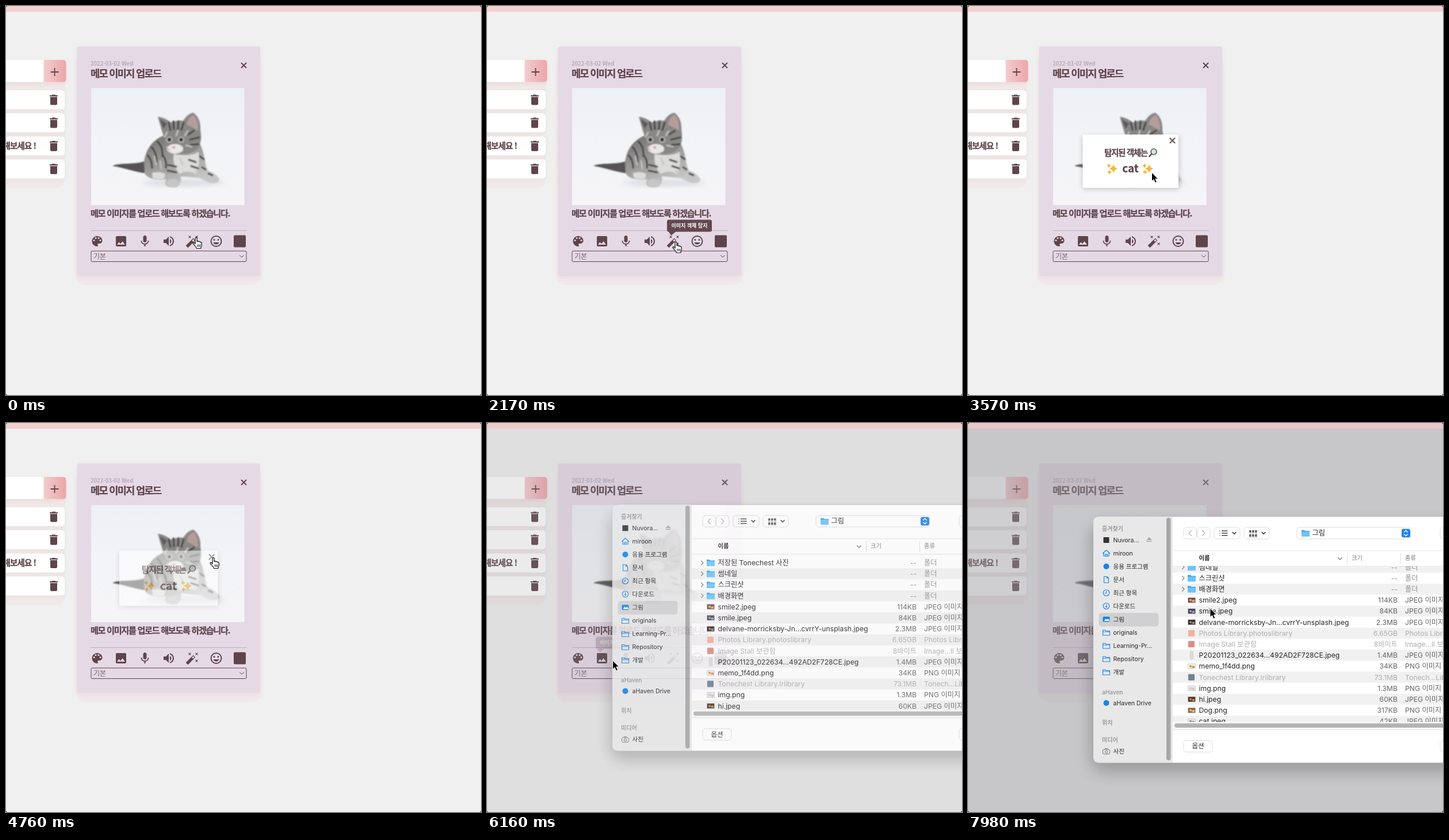
An HTML page that plays this animation: 826x678 px, repeating every 8000 ms.

```html
<!DOCTYPE html>
<html lang="ko">
<head>
<meta charset="utf-8">
<title>메모</title>
<style>
html, body { margin: 0; width: 100%; height: 100%; overflow: hidden; background: #f0f0f0; }
svg { display: block; }
text { font-family: "Noto Sans CJK KR", "Noto Sans CJK", sans-serif; fill: #5e454b; }
.b { font-weight: 700; }
.x { font-weight: 900; stroke: #5e454b; stroke-width: .25px; }
.ui text { font-family: Inter, "Noto Sans CJK KR", "Noto Sans CJK", sans-serif; fill: #262626; }
.ui .head { font-size: 10px; font-weight: 600; fill: #9b9b9d; }
.ui .side { font-size: 10.5px; }
.ui .file { font-size: 12.2px; }
.ui .dim { fill: #aeaeae; }
.ui .col { font-size: 10.3px; fill: #777; }
.line { fill: none; stroke-linecap: round; stroke-linejoin: round; }
</style>
</head>
<body>
<svg id="stage" width="826" height="678" viewBox="0 0 826 678"></svg>
<script>
const INK = '#5e454b', BLUE = '#1683e6';
const rect = (x, y, w, h, fill, r = 0, more = '') =>
  `<rect x="${x}" y="${y}" width="${w}" height="${h}" rx="${r}" fill="${fill}" ${more}/>`;
const circle = (x, y, r, fill, more = '') => `<circle cx="${x}" cy="${y}" r="${r}" fill="${fill}" ${more}/>`;
const path = (d, fill, more = '') => `<path d="${d}" fill="${fill}" ${more}/>`;
const line = (d, color, w = 1) => `<path class="line" d="${d}" stroke="${color}" stroke-width="${w}"/>`;
const text = (x, y, s, more = '') => `<text x="${x}" y="${y}" ${more}>${s}</text>`;
const group = (id, body, more = '') => `<g id="${id}" ${more}>${body}</g>`;
const icon = (x, y, d) => path(d, INK, `fill-rule="evenodd" transform="translate(${x - 12} ${y - 12})"`);
const cross = (x, y, r, w) =>
  `<path d="M${x - r} ${y - r}l${2 * r} ${2 * r}m0 ${-2 * r}l${-2 * r} ${2 * r}" stroke="${INK}" stroke-width="${w}"/>`;

const TRASH = 'M6 19c0 1.1.9 2 2 2h8c1.1 0 2-.9 2-2V7H6v12zM19 4h-3.5l-1-1h-5l-1 1H5v2h14V4z';
const PALETTE = 'M12 3c-4.97 0-9 4.03-9 9s4.03 9 9 9c.83 0 1.5-.67 1.5-1.5 0-.39-.15-.74-.39-1.01-.23-.26-.38-.61-.38-.99 0-.83.67-1.5 1.5-1.5H16c2.76 0 5-2.24 5-5 0-4.42-4.03-8-9-8z';
const IMAGE = 'M21 19V5c0-1.1-.9-2-2-2H5c-1.1 0-2 .9-2 2v14c0 1.1.9 2 2 2h14c1.1 0 2-.9 2-2zM8.5 13.5l2.5 3.01L14.5 12l4.5 6H5l3.5-4.5z';
const MIC = 'M12 14c1.66 0 3-1.34 3-3V5c0-1.66-1.34-3-3-3S9 3.34 9 5v6c0 1.66 1.34 3 3 3zm5.3-3c0 3-2.54 5.1-5.3 5.1S6.7 14 6.7 11H5c0 3.41 2.72 6.23 6 6.72V21h2v-3.28c3.28-.48 6-3.3 6-6.72z';
const SOUND = 'M3 9v6h4l5 5V4L7 9zm13.5 3c0-1.77-1.02-3.29-2.5-4.03v8.05c1.48-.73 2.5-2.25 2.5-4.02zM14 3.23v2.06c2.89.86 5 3.54 5 6.71s-2.11 5.85-5 6.71v2.06c4.01-.91 7-4.49 7-8.77s-2.99-7.86-7-8.77z';
const star = (x, y) => `M${x} ${y + 3.6}l2.5 1.4-1.4-2.5L${x + 2.5} ${y}l-2.5 1.4L${x - 2.5} ${y}l1.4 2.5-1.4 2.5z`;
const WAND = star(7.5, 2) + star(19.5, 2) + star(19.5, 14) +
  'M14.37 7.29c-.39-.39-1.02-.39-1.41 0L1.29 18.96c-.39.39-.39 1.02 0 1.41l2.34 2.34c.39.39 1.02.39 1.41 0L16.7 11.05c.39-.39.39-1.02 0-1.41zm-1.03 5.49l-2.12-2.12 2.44-2.44 2.12 2.12z';

const defs = `<defs>
  <linearGradient id="pink"><stop stop-color="#f3cccd"/><stop offset="1" stop-color="#eda6a9"/></linearGradient>
  <linearGradient id="wall" x2="0" y2="1"><stop stop-color="#edf0f4"/><stop offset=".5" stop-color="#f3f4f7"/><stop offset="1" stop-color="#f5f5f7"/></linearGradient>
  <linearGradient id="fur" x2=".6" y2="1"><stop stop-color="#6e6d6c"/><stop offset=".6" stop-color="#a3a2a1"/><stop offset="1" stop-color="#cfcfce"/></linearGradient>
  <filter id="fuzz"><feGaussianBlur stdDeviation=".8"/></filter>
  <filter id="soft" x="-30%" y="-30%" width="160%" height="160%"><feGaussianBlur stdDeviation="4"/></filter>
  <filter id="wide" x="-20%" y="-20%" width="140%" height="140%"><feGaussianBlur stdDeviation="13"/></filter>
  <clipPath id="list"><rect x="356" y="249.5" width="470" height="271.5"/></clipPath>
</defs>`;

function leftPanel() {
  let s = rect(-20, 100, 122.5, 217, '#f0e9e9', 14, 'filter="url(#fuzz)"');
  s += rect(-20, 99, 124, 37, '#ecd9d9', 6, 'filter="url(#soft)"') + rect(-10, 94, 80, 38.5, '#fff');
  s += path('M65.500 94H99q5.500 0 5.500 5.500V127q0 5.500-5.500 5.500H65.500z', 'url(#pink)');
  s += `<path d="M77.500 115h14m-7-7v14" stroke="${INK}" stroke-width="1.8"/>`;
  for (const y of [147, 187, 227.5, 267.5]) {
    s += rect(-10, y + 2, 112, 33, '#ead9d9', 5, 'filter="url(#soft)" opacity=".6"');
    s += rect(-10, y, 112, 33, '#fff', 5) + icon(83, y + 16.5, TRASH);
  }
  return s + text(52, 249, '해보세요 !', 'class="x" font-size="14.500" letter-spacing="-.9" text-anchor="end"');
}

function kitten() {
  const dark = 'M283 203l3 13M291 201l1 14M300 201l-1 14M309 203l-4 13M327 217l-10 7M336 229l-16 4M335 241l-14 1M263 236q10 8 9 26M253 246q9 9 9 26M246 260q8 8 8 22M274 262q6 9 4 20M282 277l14 3M281 287l15 3M318 268l12 4M322 279l12 4M337 262l7 5M341 281l6 4M352 292l7 3';
  const pale = 'M276 228l4-8M296 226l3-9M311 226l5-8M313 243l10 2M280 246l4 6M258 262l3 14M268 270l2 14M303 266l4 10M329 288l8 3';
  return rect(148, 143, 266.500, 204, 'url(#wall)') +
    `<ellipse cx="308" cy="308" rx="72" ry="6" fill="#dcdde1" filter="url(#soft)"/><g filter="url(#fuzz)">` +
    path('M186 278C200 273 224 277 243 270L250 291C232 293 212 283 186 279z', '#545353') +
    path('M240 272C243 247 258 230 280 224L337 240C346 256 345 275 351 287C362 290 373 298 371 305C364 312 350 309 338 300L304 297C306 312 298 318 288 316C276 316 275 308 279 302C265 304 245 302 241 291z', 'url(#fur)') +
    path('M292 257Q318 264 335 254Q338 275 331 293Q315 285 302 293Q288 275 292 257zM254 291q14-4 23 2l-2 8q-14 2-20-2z', '#dcdcdb') +
    path('M344 294q20-1 26 8-2 7-13 6-13-3-13-14zM279 305q12-8 23 2 0 8-12 8-11 0-11-10z', '#c6c6c5') +
    path('M264 193Q275 194 287 203Q298 198 308 200Q316 187 326 186Q339 196 338 216Q342 236 333 249Q318 260 296 259Q279 253 276 233Q271 218 264 193z', '#888786') +
    path('M314 206Q319 191 327 190Q335 200 334 217z', '#b59d9a') + path('M267 197l13 8-6 9z', '#5c5a59') +
    `<ellipse cx="294" cy="249" rx="14" ry="8.500" fill="#e9e8e6"/>` +
    line(dark, '#454443', 3) + line(pale, '#c4c3c1', 2.6) +
    [284, 304.5].map(x => circle(x, 233, 5.2, '#c5c6c0') + circle(x, 233, 3.4, '#2c2e2e')).join('') +
    path('M288 245h7l-3 4z', '#c58c8c') + '</g>';
}

function memo() {
  let s = rect(120.5, 84, 324, 402.5, '#f0e8e9', 18, 'filter="url(#fuzz)"');
  s += rect(124, 73, 318, 401, '#e9d9de', 6, 'filter="url(#soft)" opacity=".7"') + rect(123.5, 70.5, 318.5, 400, '#e6d9e6', 4);
  s += text(147, 104, '2022-03-02 Wed', 'class="x" font-size="9.600" letter-spacing="-.1" style="fill:#bbaab6;stroke:none"');
  s += text(147, 124.3, '메모 이미지 업로드', 'class="x" font-size="17.500" letter-spacing="-1.600"');
  s += cross(413.5, 103.5, 4.5, 2) + kitten();
  s += text(147, 366.7, '메모 이미지를 업로드 해보도록 하겠습니다.', 'class="x" font-size="15.200" letter-spacing="-1.360"');
  s += rect(148, 391, 271, 1, '#bfaebc');
  s += icon(158.5, 410, PALETTE);
  for (const [x, y] of [[153, 408.5], [156, 404.5], [161, 404.5], [164, 408.5]]) s += circle(x, y, 1.5, '#e6d9e6');
  s += icon(200, 410, IMAGE) + icon(241.500, 410, MIC) + icon(283, 410, SOUND) + icon(324, 410, WAND);
  s += circle(365.5, 410, 9, 'none', `stroke="${INK}" stroke-width="2"`) + circle(362, 407.5, 1.5, INK) + circle(369, 407.5, 1.5, INK);
  s += path('M360.400 412h10.200q-1.500 3.500-5.100 3.500t-5.100-3.500z', INK);
  s += rect(396, 399.5, 21, 21, INK, 2);
  s += rect(148, 427, 270, 18.5, 'none', 2, `stroke="${INK}"`);
  s += text(152, 440.5, '기본', 'font-size="12" style="fill:#76636f"') + line('M406.500 434.500l3.500 3.500 3.500-3.500', INK);
  return s;
}

const tip = (id, x, w, label) => group(id,
  rect(x, 372.5, w, 21, '#64484f', 3) + path(`M${x + 2} 392h15l-10 8z`, '#64484f') +
  text(x + w / 2, 386.3, label, 'class="b" font-size="9" text-anchor="middle" style="fill:#fff"'));

const spark = (x, y, r) => path(`M${x} ${y - r}Q${x + r * .2} ${y - r * .2} ${x + r} ${y}Q${x + r * .2} ${y + r * .2} ${x} ${y + r}Q${x - r * .2} ${y + r * .2} ${x - r} ${y}Q${x - r * .2} ${y - r * .2} ${x} ${y - r}z`, '#f6b73f');
const sparkles = x => spark(x + 2, 283.5, 7.5) + spark(x - 6, 278.5, 4) + spark(x - 5, 289.5, 4);

function popup() {
  return rect(199, 227, 168, 92, '#8d7f85', 3, 'filter="url(#soft)" opacity=".45"') + rect(199.5, 224, 166.5, 93, '#fff', 2) +
    cross(355.5, 234.5, 4.6, 2) +
    text(237, 261, '탐지된 객체는', 'class="x" font-size="14.500" letter-spacing="-1.350"') +
    line('M319 258l-3.500 4', '#4d4648', 2.6) + circle(323, 254, 5, '#d5e4ea', 'stroke="#5a5355" stroke-width="1.6"') +
    sparkles(251) + sparkles(313) +
    text(282.5, 290, 'cat', 'class="x" font-size="19" text-anchor="middle"');
}

const SIDE = [
  ['Nuvora...', 204], ['miroon', 227], ['응용 프로그램', 250], ['문서', 273], ['최근 항목', 296], ['다운로드', 319],
  ['그림', 342], ['originals', 365], ['Learning-Pr...', 388], ['Repository', 411], ['개발', 434],
  ['aHaven Drive', 488], ['사진', 572]];

function sideIcon(i, y) {
  const x = 240.5, ring = circle(x, y, 5.3, 'none', `stroke="${BLUE}" stroke-width="1.1"`);
  const folder = `M${x - 6} ${y - 4}h4l1.500 1.500h6.500v7.500h-12z`;
  if (i === 0) return rect(x - 5, y - 5, 10, 10, '#333', 1);
  if (i === 1) return line(`M${x - 6} ${y}l6-5.500 6 5.500m-10.500-1v6h9v-6m-6 6v-3.500h3v3.500`, BLUE, 1.2);
  if (i === 2 || i === 11) return circle(x, y, 5, BLUE);
  if (i === 3) return line(`M${x - 4} ${y - 5.5}h5l3 3v8h-8zm5 0v3h3`, BLUE, 1.1);
  if (i === 4) return ring + line(`M${x} ${y - 3}v3.500h-2.500`, BLUE);
  if (i === 5) return ring + line(`M${x} ${y - 3}v5.500m-2-2l2 2 2-2`, BLUE);
  if (i === 6) return rect(x - 6, y - 4.5, 12, 9, BLUE, 1.5) + path(`M${x - 4} ${y + 3}l3-4 2 2 2-2 3 4z`, '#fff');
  if (i === 12) return rect(x - 6, y - 3, 12, 8, 'none', 2, 'stroke="#777"') + circle(x, y + 1, 2.2, 'none', 'stroke="#777"') + line(`M${x - 2} ${y - 4.5}h4`, '#777', 1.2);
  return line(folder, BLUE, 1.1) + line(`M${x - 6} ${y - 1}h12`, BLUE, .9);
}

function sidebar() {
  let s = path('M356 163H228q-10 0-10 10V582q0 10 10 10H356z', '#e8e8e9') + rect(227.5, 331, 104, 23.5, '#d0d0d2', 5);
  for (const [label, y] of [['즐겨찾기', 184], ['aHaven', 469], ['위치', 522], ['미디어', 552]])
    s += text(233, y + 4, label, 'class="head"');
  SIDE.forEach(([label, y], i) => s += sideIcon(i, y) + text(252.5, y + 4, label, 'class="side"'));
  s += path('M310.500 204l4.500-5 4.500 5zM310.500 205.500h9v1.500h-9z', '#a5a5a7');
  return s + rect(345, 165, 7.5, 423, '#a7a7a8', 3.7);
}

const JPEG = 'JPEG 이미지', PNG = 'PNG 이미지';
// name, size, type, icon colours
const FILES = [
  ['저장된 Tonechest 사진'], ['썸네일'], ['스크린샷'], ['배경화면'],
  ['smile2.jpeg', '114KB', JPEG, '#7b4b3d', '#d9b08c'], ['smile.jpeg', '84KB', JPEG, '#44464f', '#9aa3b7'],
  ['delvane-morricksby-Jn...cvrrY-unsplash.jpeg', '2.3MB', JPEG, '#302b28', '#a78a6b'],
  ['Photos Library.photoslibrary', '6.65GB', 'Photos Library', 'dot', '#f0b39d'],
  ['Image Stall 보관함', '8바이트', 'Image...ll 보관함', 'dot', '#dc8d86'],
  ['P20201123_022634...492AD2F728CE.jpeg', '1.4MB', JPEG, 'tall', '#dcdcdc'],
  ['memo_1f4dd.png', '34KB', PNG, '#ececec', '#d5963f'],
  ['Tonechest Library.lrlibrary', '73.1MB', 'Tonech...Library', 'dot', '#6f8297'],
  ['img.png', '1.3MB', PNG, '#e7e7e7', '#c9c9c9'], ['hi.jpeg', '60KB', JPEG, '#513021', '#b78956'],
  ['Dog.png', '317KB', PNG, '#98603a', '#ddc091'], ['cat.jpeg', '42KB', JPEG, '#e2e4e6', '#929292']];

const folderIcon = (x, y) => path(`M${x - 7} ${y - 5.5}h5l1.500 1.500h7.500v9.500h-14z`, '#3fa9e8') + rect(x - 7, y - 2.5, 14, 8.5, '#6cc4f5', 1);

function fileRow([name, size = '--', type = '폴더', a, b], i) {
  const y = 264.3 + 19.2 * i, dim = a === 'dot' ? ' dim' : '';
  let s = i % 2 ? rect(356, y - 9.6, 470, 19.2, '#f1f1f1') : '';
  if (!a) s += folderIcon(389, y) + line(`M372.500 ${y - 3.5}l3.500 3.500-3.500 3.500`, '#777', 1.2);
  else if (a === 'dot') s += rect(383, y - 5.5, 11, 11, b, 1);
  else if (a === 'tall') s += rect(386.5, y - 7, 5, 14, b, 1, 'stroke="#c5c5c5" stroke-width=".6"');
  else s += rect(382.5, y - 4.5, 13, 9, a, .5, 'stroke="#c9c9c9" stroke-width=".7"') + circle(387, y, 2, b) + rect(389.5, y - .5, 4.5, 3.5, b);
  const grey = !a ? 'fill:#8e8e8e' : dim ? '' : 'fill:#666';
  return s + text(401.5, y + 4.4, name, `class="file${dim}"`) +
    text(747, y + 4.4, size, `class="file${dim}" text-anchor="end" style="${grey}"`) +
    text(760, y + 4.4, type, `class="file${dim}" style="${grey}"`);
}

function dialog() {
  const box = (x, y, w, h = 20) => rect(x, y, w, h, '#fff', 5, 'stroke="#dcdcdc"');
  const down = (x, y) => line(`M${x - 3} ${y - 1.5}l3 3 3-3`, '#333', 1.5);
  let s = rect(212, 176, 680, 434, '#000', 26, 'filter="url(#wide)" opacity=".2"');
  s += rect(218, 163, 660, 429.5, '#fff', 10, 'stroke="#aaa" stroke-width=".7"') + sidebar();
  s += box(375, 182, 22.5) + box(398.5, 182, 22.5);
  s += line('M388.500 187.500l-4.500 4.500 4.500 4.500M407.500 187.500l4.500 4.500-4.500 4.500', '#b4b4b4', 1.3);
  s += box(428, 182, 45) + line('M438 188h.1m3.400 0h9.500M438 192h.1m3.400 0h9.500M438 196h.1m3.400 0h9.500', '#444', 1.3) + down(463, 192);
  s += box(480, 182, 44);
  for (let i = 0; i < 6; i++) s += rect(489 + i % 3 * 5, i < 3 ? 187 : 194, 3.6, 3.6, '#555', .6) + rect(489 + i % 3 * 5, i < 3 ? 191.500 : 198, 3.6, .8, '#555');
  s += down(514, 192) + box(572, 182, 198) + folderIcon(587, 192) + text(598.5, 196.2, '그림', 'class="file"');
  s += rect(754, 184.5, 15, 15, '#2581ec', 3.5) + line('M758.700 190l2.800-2.800 2.800 2.800m-5.600 4l2.800 2.800 2.800-2.800', '#fff', 1.4);
  s += box(821, 182, 40) + rect(356, 222, 470, 1, '#e3e3e3') + rect(356, 249, 470, 1, '#e3e3e3');
  s += text(401.5, 239, '이름', 'class="col" style="fill:#222;font-weight:600"') + line('M643.500 234.500l3.500 3.500 3.500-3.500', '#777', 1.2);
  s += rect(659, 227, 1, 18, '#ddd') + text(667, 239, '크기', 'class="col"') + rect(752, 227, 1, 18, '#ddd') + text(760, 239, '종류', 'class="col"');
  s += `<g clip-path="url(#list)">${group('rows', FILES.map(fileRow).join(''))}</g>`;
  s += rect(356, 521, 470, 12, '#fafafa') + rect(359, 523.5, 500, 7.5, '#b3b3b3', 3.7) + rect(356, 533.5, 470, 1, '#dcdcdc');
  s += box(375, 553.500, 50) + text(400, 567.3, '옵션', 'class="side" text-anchor="middle" style="font-size:11.500px"') + box(821, 553.5, 40);
  return s;
}

const hand = path('M4.600 11.500V2.100C4.600.2 7.600.2 7.600 2.100V7.600C7.800 6.200 10.300 6.400 10.400 8C10.900 6.900 13 7.200 13.100 8.800C13.800 8 15.800 8.400 15.800 10.200V13.500C15.800 15.500 14.600 16.500 14.300 19.500H7C6.800 17.500 4.200 15.200 2.900 13.600L.8 11C0 9.600 1.900 8.400 3.200 9.900z', '#fff',
  'stroke="#111" stroke-width="1.2" stroke-linejoin="round" transform="translate(-6 -1)"') +
  line('M2.500 12v3.500M4.800 12v3.500M7.100 12v3.500', '#111');
const arrow = path('M0 0V15.500L3.500 12.300L6 18.200L8.800 17L6.300 11.200H11z', '#000', 'stroke="#fff" stroke-width="1"');

const stage = document.getElementById('stage');
stage.innerHTML = defs + rect(0, 0, 826, 678, '#f0f0f0') + rect(0, 0, 826, 10, '#f3cfcf') +
  leftPanel() + memo() + tip('tipWand', 313, 78, '이미지 객체 탐지') + tip('tipImage', 189, 67, '이미지 업로드') +
  group('popup', popup()) +
  group('shade', rect(0, 0, 826, 10, '#999', 0, 'opacity=".13"') + rect(0, 10, 826, 668, '#96969a', 0, 'opacity=".45"')) +
  group('dialog', dialog(), 'class="ui"') + circle(0, 0, 37, INK, 'id="ring" opacity=".1"') +
  group('hand', hand) + group('arrow', arrow) +
  path('M0 0h2L0 2zM826 0h-2l2 2zM0 678h2l-2-2zM826 678h-2l2-2z', '#333');

const $ = Object.fromEntries([...stage.querySelectorAll('[id]')].map(e => [e.id, e]));

// Eased value between the rows [time, value] around t
function at(t, keys, k = 1) {
  if (t <= keys[0][0]) return keys[0][k];
  for (let i = 1; i < keys.length; i++) {
    const a = keys[i - 1], b = keys[i];
    if (t > b[0]) continue;
    const p = (t - a[0]) / (b[0] - a[0]);
    return a[k] + (b[k] - a[k]) * p * p * (3 - 2 * p);
  }
  return keys[keys.length - 1][k];
}
const put = (e, x, y) => e.setAttribute('transform', `translate(${x} ${y})`);
const fade = (e, v) => {
  e.setAttribute('opacity', v);
  e.setAttribute('visibility', v > 0 ? 'visible' : 'hidden');
};

const STEP = 70;
const CLICKS = [2310, 4550, 5740];
const HANDS = [[0, 3080], [4270, 4900], [5530, 5950]];
const POINTER = [
  [0, 330.5, 404], [210, 330, 408], [980, 330, 408], [1820, 328.5, 411], [2170, 328.5, 411.5], [2940, 328.5, 411.5],
  [3500, 320, 290], [3570, 319.5, 290], [3780, 318, 282], [4410, 360, 235], [4620, 360, 235], [4760, 360.5, 235],
  [5320, 172, 378], [5670, 200, 411], [5950, 200.5, 412], [6090, 200.5, 412], [6440, 374, 429],
  [6790, 374, 429], [6860, 376, 427], [7560, 438, 312], [7980, 421, 323]];

function draw(ms) {
  const t = Math.floor(ms / STEP) * STEP;
  fade($.tipWand, at(t, [[0, 0], [210, 1], [3010, 1], [3220, 0]]));
  fade($.tipImage, at(t, [[5460, 0], [5670, 1], [6020, 1], [6230, 0]]));

  const size = at(t, [[2450, .9], [2870, 1], [4620, 1], [4900, 1.06]]);
  $.popup.setAttribute('transform', `translate(282.7 270.500) scale(${size}) translate(-282.700 -270.500)`);
  fade($.popup, at(t, [[2450, 0], [2800, 1], [4620, 1], [4900, 0]]));

  fade($.shade, at(t, [[5880, 0], [6020, .2], [6440, 1]]));
  fade($.dialog, at(t, [[5880, 0], [6020, .45], [6230, 1]]));
  put($.dialog, 0, at(t, [[5880, -33], [6020, -28], [6440, 0]]));
  put($.rows, 0, -at(t, [[6720, 0], [6790, 12], [6860, 23.2], [7000, 30.5], [7210, 32.3]]));

  const x = at(t, POINTER), y = at(t, POINTER, 2);
  const over = HANDS.some(([a, b]) => t >= a && t < b);
  for (const e of [$.hand, $.arrow, $.ring]) put(e, x, y);
  fade($.hand, over ? 1 : 0);
  fade($.arrow, over ? 0 : 1);
  fade($.ring, CLICKS.some(c => t >= c && t < c + STEP) ? .1 : 0);
}

function tick() {
  draw(performance.now() % 8000);
  requestAnimationFrame(tick);
}
tick();
</script>
</body>
</html>
```
